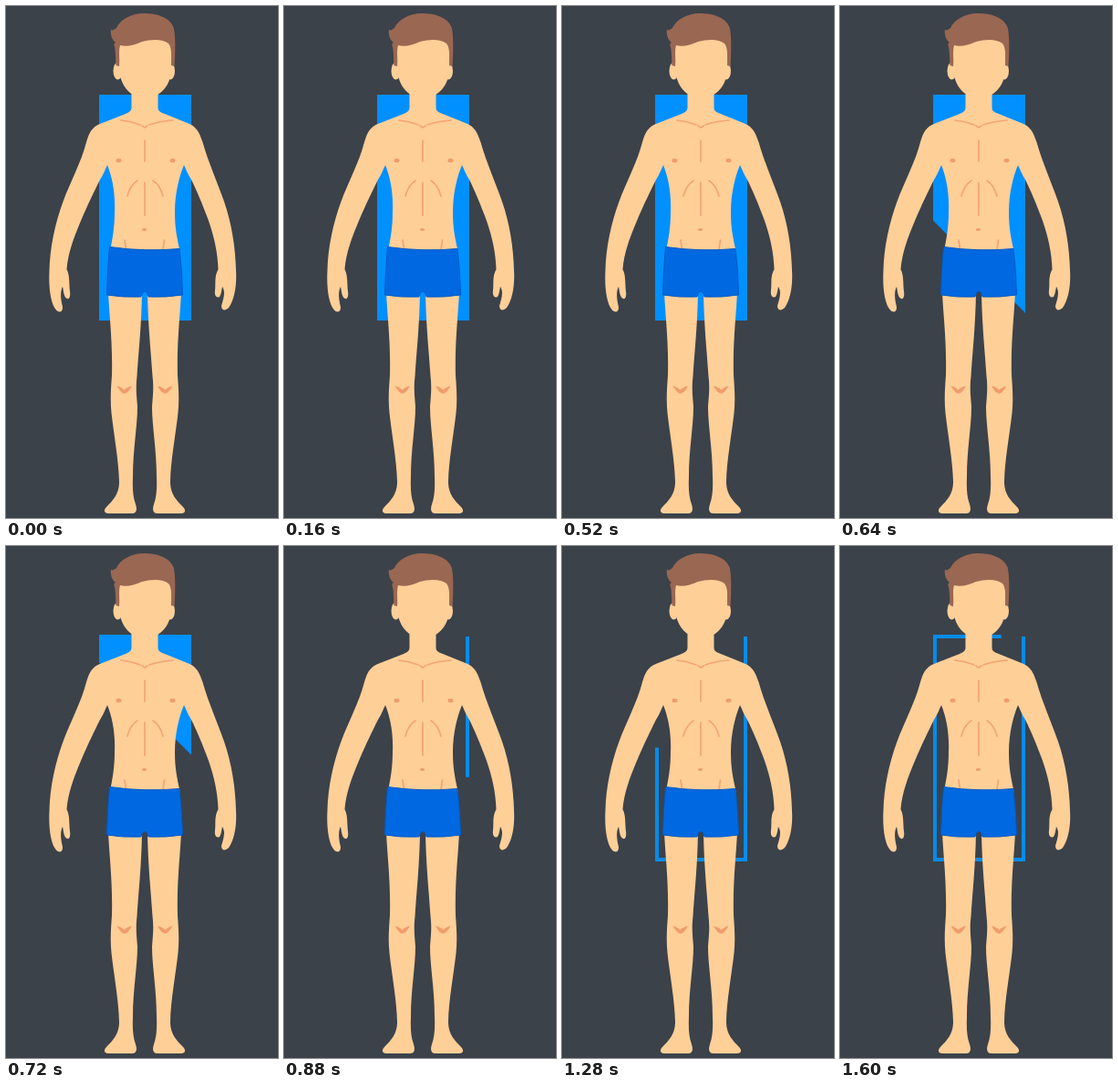
Animation of 298x560 px, one loop 1.64 s. Source, as an HTML page:

```html
<!DOCTYPE html>
<html lang="en">
<head>
<meta charset="utf-8">
<title>Outline and fill</title>
<style>
  html, body { margin: 0; width: 100%; height: 100%; overflow: hidden; background: #3b424a; }
  svg { display: block; width: 100%; height: 100%; }
  .fill { fill: #0090ff; animation: wipe 1640ms linear infinite; }
  .outline {
    fill: none; stroke: #058ceb; stroke-width: 4;
    stroke-dasharray: 682 690; stroke-dashoffset: 682;
    animation: draw 1640ms linear infinite;
  }
  .skin { fill: #ffcf98; }
  .line { fill: none; stroke: #f4a473; stroke-width: 1.7; stroke-linecap: round; stroke-linejoin: round; }
  .dot { fill: #f09c6c; }
  .hair { fill: #9a6752; }
  .shorts { fill: #0069e1; stroke: #0059c4; stroke-width: 1; }

  /* diagonal edge travels up to the top right corner */
  @keyframes wipe {
    0%, 34.15% { transform: translateY(0); }
    39.02% { transform: translateY(-109px); }
    50%, 100% { transform: translateY(-350px); }
  }
  @keyframes draw {
    0%, 41.46% { stroke-dashoffset: 682; }
    53.66% { stroke-dashoffset: 529; }
    68.29% { stroke-dashoffset: 346; }
    78.05% { stroke-dashoffset: 219; }
    97.56% { stroke-dashoffset: 25; }
    100% { stroke-dashoffset: 0; }
  }
</style>
</head>
<body>
<svg viewBox="0 0 298 560">
  <defs>
    <clipPath id="box"><rect x="102.500" y="97.500" width="100.500" height="246.500"/></clipPath>
    <path id="leg" d="M112 312C113 338 117 366 116 404C115 418 114 430 115.500 445C118 468 124 500 124 522
      C123.500 534 117 541 110 548C107 551 107 555 112 555H138C143 555 144 551 142 545C139 537 138.500 528 139 515
      C139 485 144 460 144 438C143 425 142 418 143.500 405C145 380 148.500 350 149 312Z"/>
    <path id="knee" d="M121.500 415.500Q127 417 129.500 420Q132 417 138 415.500Q134 423.500 129.500 424Q126 423.500 121.500 415.500Z"/>
  </defs>

  <path class="outline" d="M201 99V343H104V99H201"/>
  <g clip-path="url(#box)"><path class="fill" d="M102 345L203 446V-300H102Z"/></g>

  <g class="skin">
    <use href="#leg"/>
    <use href="#leg" transform="matrix(-1 0 0 1 304 0)"/>
    <path d="M137.500 88V111C137.500 115 135 116 131 118L104 128.500C94 132 91 139 88 149
      C82 172 71 191 62.500 214C54 237 48 264 47.500 290C46.500 308 49 326 55 332.500C59 336.500 62.500 334 62 329
      C60 321 59 313 62 307C63 311 63 317 66 319.500C69 322 71 318 70 312C69 304 70 294 66.500 288
      C68 270 74 254 82 235C90 216 97 202 103 190C107 184 109 178 111 174
      C116 186 120 204 119 225C119 242 117 253 114 268L191 270
      C187 253 185 242 185 226C185 204 190 186 195 174
      C197 178 199 184 203 190C209 202 215 216 222 235C228 252 232 270 232.500 288
      C228 296 230 303 229 311C228 317 231 320 234 318C236 315 236 311 237 307
      C241 313 238 321 236 328C236 333 240 334 244 330C250 322 253 306 252 290
      C251.500 264 247 237 239 214C231 191 222 172 215.500 149C212 139 209 132 200 128.500
      L174 118C169 116 166.500 115 166.500 111V88Z"/>
    <ellipse cx="122.500" cy="71" rx="5" ry="9.500"/>
    <ellipse cx="180" cy="71" rx="5" ry="9.500"/>
    <path d="M123 34H182V64C182 86 169 101 152.500 101C136 101 123.500 86 123.500 64Z"/>
  </g>

  <path class="hair" d="M124 66L120.500 65C120 56 120 49 119 45C118 42 118 41 120 40C116 37 114 31 115 25C116 28 118 26 121 24
    C125 15 137 8 151 8C165 8 179 12 183.500 23C186 32 185.500 52 184.500 66L181 65C181 54 182 46 178 41
    C172 36 160 36 149 39C140 43 132 45 125 43C123 50 125 58 124 66Z"/>

  <g class="line">
    <path d="M126 125Q137 126 147 130M183 125Q168 126 157 130M149 131L152 133L155 131"/>
    <path d="M152 147V170M152 193V229"/>
    <path d="M144 191Q136 196 133 208M161 191Q169 196 172 208"/>
    <path d="M130 256L131.500 266M173.500 256L172 266"/>
  </g>
  <g class="dot">
    <use href="#knee"/>
    <use href="#knee" transform="matrix(-1 0 0 1 304 0)"/>
    <ellipse cx="123.500" cy="169" rx="3" ry="2.200"/>
    <ellipse cx="182.500" cy="169" rx="3" ry="2.200"/>
    <ellipse cx="151.500" cy="244.500" rx="2.600" ry="1.500"/>
  </g>

  <path class="shorts" d="M113.500 263.500Q152 269 190 265.500Q193 290 193.500 316Q175 319 156 318
    Q155 312 152 312Q149 312 148 318Q128 319 110.500 316Q111 289 113.500 263.500Z"/>
</svg>
</body>
</html>
```
